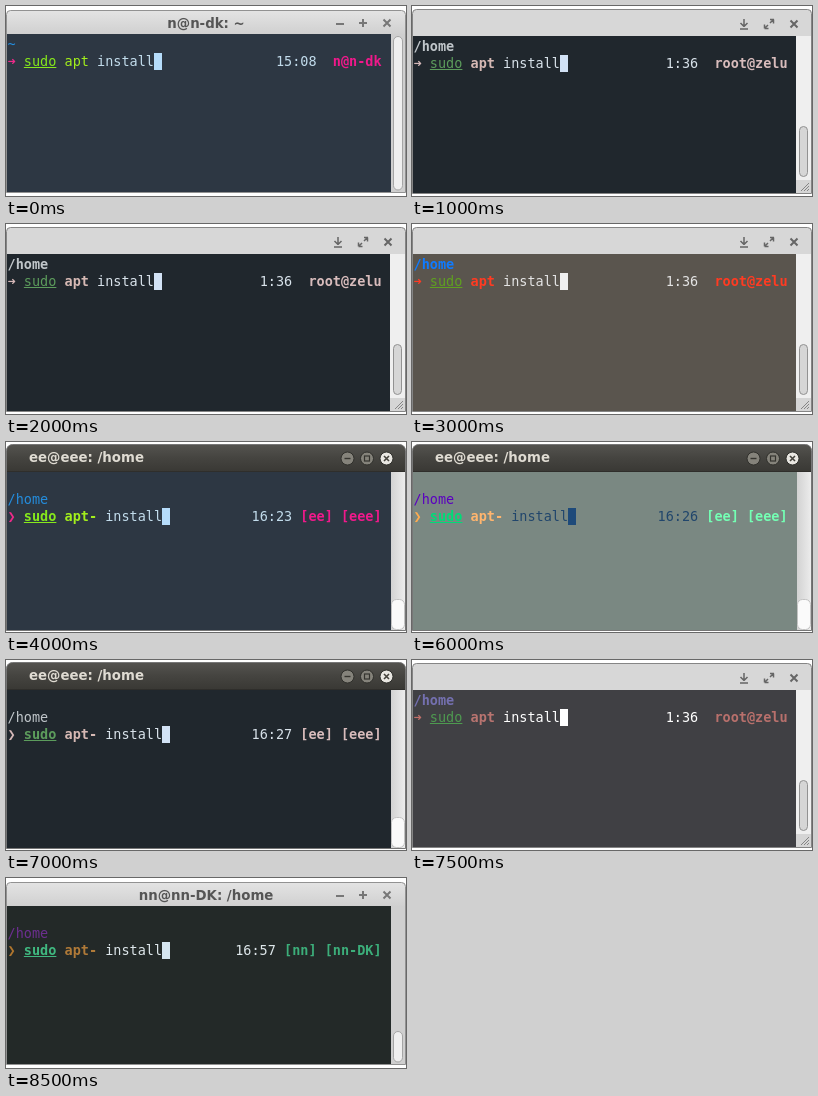
Write an HTML page with a canvas that moves like this. It is 400x190 px and loops after 9 s.

```html
<!DOCTYPE html>
<html lang="en">
<head>
<meta charset="utf-8">
<title>Terminal themes</title>
<style>
  html, body { margin: 0; width: 100%; height: 100%; overflow: hidden; background: #fff; }
  canvas { display: block; width: 400px; height: 190px; }
</style>
</head>
<body>
<canvas id="stage" width="400" height="190"></canvas>
<script>
const ctx = document.getElementById('stage').getContext('2d');
const STEP = 500, CELL = 8.13, LINE = 17, LEFT = 1.6, COLUMNS = 46;
const MONO = '13.5px "DejaVu Sans Mono", monospace';
const TITLE = 'bold 13.33px "DejaVu Sans", sans-serif';

function rect(x, y, w, h, fill) {
  ctx.fillStyle = fill;
  ctx.fillRect(x, y, w, h);
}
function rounded(x, y, w, h, radius, fill, stroke) {
  ctx.beginPath();
  ctx.roundRect(x, y, w, h, radius);
  ctx.fillStyle = fill;
  ctx.fill();
  if (stroke) {
    ctx.strokeStyle = stroke;
    ctx.lineWidth = 1;
    ctx.stroke();
  }
}
function lines(color, width, ...segments) {
  ctx.strokeStyle = color;
  ctx.lineWidth = width;
  ctx.beginPath();
  for (const [x1, y1, x2, y2] of segments) {
    ctx.moveTo(x1, y1);
    ctx.lineTo(x2, y2);
  }
  ctx.stroke();
}
function cross(x, y, r, color, width) {
  lines(color, width, [x - r, y - r, x + r, y + r], [x - r, y + r, x + r, y - r]);
}
function vertical(y1, y2, ...colors) {
  const gradient = ctx.createLinearGradient(0, y1, 0, y2);
  colors.forEach((color, i) => gradient.addColorStop(i / (colors.length - 1), color));
  return gradient;
}
function horizontal(x1, x2, from, to) {
  const gradient = ctx.createLinearGradient(x1, 0, x2, 0);
  gradient.addColorStop(0, from);
  gradient.addColorStop(1, to);
  return gradient;
}
function caption(text, x, y, color, align) {
  ctx.font = TITLE;
  ctx.textAlign = align;
  ctx.fillStyle = color;
  ctx.fillText(text, x, y);
}

const windows = {
  light: {
    top: 28, bottom: 186, right: 385, first: 42.5,
    draw({ title, full }) {
      rounded(.5, 4.5, 399, 182, [4, 4, 0, 0], vertical(4, 28, '#e4e4e4', '#d0d0d0'), '#929292');
      caption(title, 200, 22, '#555', 'center');
      lines('#777', 2, [330, 18, 338, 18], [353, 17, 361, 17], [357, 13, 357, 21]);
      cross(381, 17, 3.5, '#777', 2);
      rect(385, 28, 14, 158, '#cfcfcf');
      const y = full ? 30.5 : 153.5;
      rounded(387.5, y, 9, 184 - y, 4.5, '#efefef', '#a5a5a5');
    }
  },
  flat: {
    top: 30, bottom: 187, right: 384, first: 44.5,
    draw() {
      rounded(.5, 3.5, 399, 184, [4, 4, 0, 0], '#d7d7d7', '#858585');
      lines('#666', 1.5,
        [332, 13, 332, 20], [328.5, 17, 332, 20.5], [335.5, 17, 332, 20.5], [328, 23, 336, 23],
        [358, 17, 361.5, 13.5], [358, 13.5, 362, 13.5], [361.5, 13.5, 361.5, 17.5],
        [356, 19, 352.5, 22.5], [352.5, 18.5, 352.5, 22.5], [352.5, 22.5, 356.5, 22.5]);
      cross(382, 18, 3.5, '#666', 2);
      rect(384, 30, 15, 157, '#efefef');
      rounded(387.5, 120.5, 8, 50, 4, '#d6d6d6', '#929292');
      rect(384, 174, 15, 13, '#d5d5d5');
      lines('#858585', 1, [389, 185, 397, 177], [392, 185, 397, 180], [395, 185, 397, 183]);
    }
  },
  dark: {
    top: 30, bottom: 188, right: 385, first: 44.5,
    draw({ title }) {
      rounded(.5, 2.5, 399, 186, [6, 6, 0, 0], vertical(2, 30, '#555450', '#454440', '#393834'), '#777');
      rect(1, 29, 398, 1, '#2f2e2b');
      caption(title, 23, 20, '#dfdbd2', 'left');
      for (const x of [341.5, 361, 380.5])
        rounded(x - 6.5, 10, 13, 13, 6.5, x > 370 ? '#e9e7e2' : '#85837b', '#30302c');
      lines('#35342f', 1.4, [338.5, 16.5, 344.5, 16.5]);
      ctx.lineWidth = 1.2;
      ctx.strokeRect(358.5, 14, 5, 5);
      cross(380.5, 16.5, 2.5, '#44423c', 1.6);
      rect(385, 30, 14, 158, horizontal(385, 399, '#d2d2d2', '#ececec'));
      rounded(385.5, 157.5, 13, 30, 5, '#fafafa', '#c2c2c2');
    }
  }
};

// Colours: background, path, prompt, command, package tool, text, cursor, host.
const themes = {
  slate:  ['#2d3743', '#248cdc', '#ee2a8a', '#86e81c', '#a2ee1c', '#c2dcec', '#b5dcfb', '#f0198b'],
  coal:   ['#20272d', '#c0c6ca', '#d5b8b8', '#5c9c5c', '#d6b9b4', '#d8e2ea', '#d2e2f5', '#d8bcbc'],
  earth:  ['#5a554e', '#0f7bff', '#ff3b25', '#5fa020', '#ff3b22', '#e4e4e4', '#f0f0f0', '#ff3b22'],
  paper:  ['#ffffff', '#3c86ba', '#d64f92', '#d85a98', '#28496a', '#28496a', '#23476b', '#a2cd6e'],
  sage:   ['#7a8882', '#5b00c0', '#ffab50', '#00dc78', '#ffb56e', '#21466c', '#1e4a7a', '#74ffb4'],
  stone:  ['#404044', '#7470b0', '#c0706a', '#4e9a50', '#b87470', '#ffffff', '#ffffff', '#b8706c'],
  forest: ['#232928', '#6c2f90', '#b0762e', '#40b880', '#b07a38', '#dde6ea', '#d5e5f0', '#3cae7a']
};

const solo = (theme, extra) => ({
  frame: 'light', theme, title: 'n@n-dk: ~', full: true, path: '~', arrow: true,
  thinTool: true, clock: '15:08', host: ' n@n-dk', ...extra
});
const admin = theme => ({
  frame: 'flat', theme, path: '/home', arrow: true, boldPath: true, clock: '1:36', host: ' root@zelu'
});
const panel = (theme, clock, extra) => ({
  frame: 'dark', theme, title: 'ee@eee: /home', path: '/home', tool: 'apt-', boldCommand: true,
  row: 1, clock, host: '[ee] [eee]', ...extra
});
const desk = clock => ({
  ...panel('forest', clock), frame: 'light', title: 'nn@nn-DK: /home', host: '[nn] [nn-DK]'
});
const short = { command: 'sud', plain: true, thinTool: true };

const scenes = [
  solo('slate'),
  solo('forest', { title: 'n@n-dk: /home', path: '/home' }),
  admin('coal'),
  panel('forest', '16:22'),
  admin('coal'),
  admin('coal'),
  admin('earth'),
  admin('stone'),
  panel('slate', '16:23'),
  panel('slate', '16:23', short),
  panel('paper', '16:24', short),
  desk('16:55'),
  panel('sage', '16:26'),
  panel('sage', '16:26', short),
  panel('coal', '16:27'),
  admin('stone'),
  panel('slate', '16:28'),
  desk('16:57')
];

function type(text, column, y, color, bold) {
  ctx.font = (bold ? 'bold ' : '') + MONO;
  ctx.textAlign = 'left';
  ctx.fillStyle = color;
  ctx.fillText(text, LEFT + column * CELL, y);
}

function draw(scene) {
  const frame = windows[scene.frame];
  const [back, path, prompt, command, tool, text, cursor, host] = themes[scene.theme];
  const word = scene.command || 'sudo', manager = scene.tool || 'apt';
  const pathY = frame.first + (scene.row || 0) * LINE, y = pathY + LINE;

  rect(0, 0, 400, 190, '#fff');
  frame.draw(scene);
  rect(1, frame.top, frame.right - 1, frame.bottom - frame.top, back);

  type(scene.path, 0, pathY, path, scene.boldPath);
  type(scene.arrow ? '➜' : '❯', 0, y, prompt, true);
  type(word, 2, y, command, scene.boldCommand);
  if (!scene.plain) rect(LEFT + 2 * CELL, Math.round(y + 1), word.length * CELL, 1, command);

  let column = 3 + word.length;
  type(manager, column, y, tool, !scene.thinTool);
  column += manager.length + 1;
  type('install', column, y, text);
  rect(Math.round(LEFT + (column + 7) * CELL), Math.round(y - 13), 8, LINE, cursor);

  const hostColumn = COLUMNS - scene.host.length;
  type(scene.clock, hostColumn - scene.clock.length - 1, y, text);
  type(scene.host, hostColumn, y, host, true);
}

let shown = -1;
function tick() {
  const index = Math.floor(performance.now() / STEP) % scenes.length;
  if (index !== shown) draw(scenes[shown = index]);
  requestAnimationFrame(tick);
}
tick();
</script>
</body>
</html>
```
